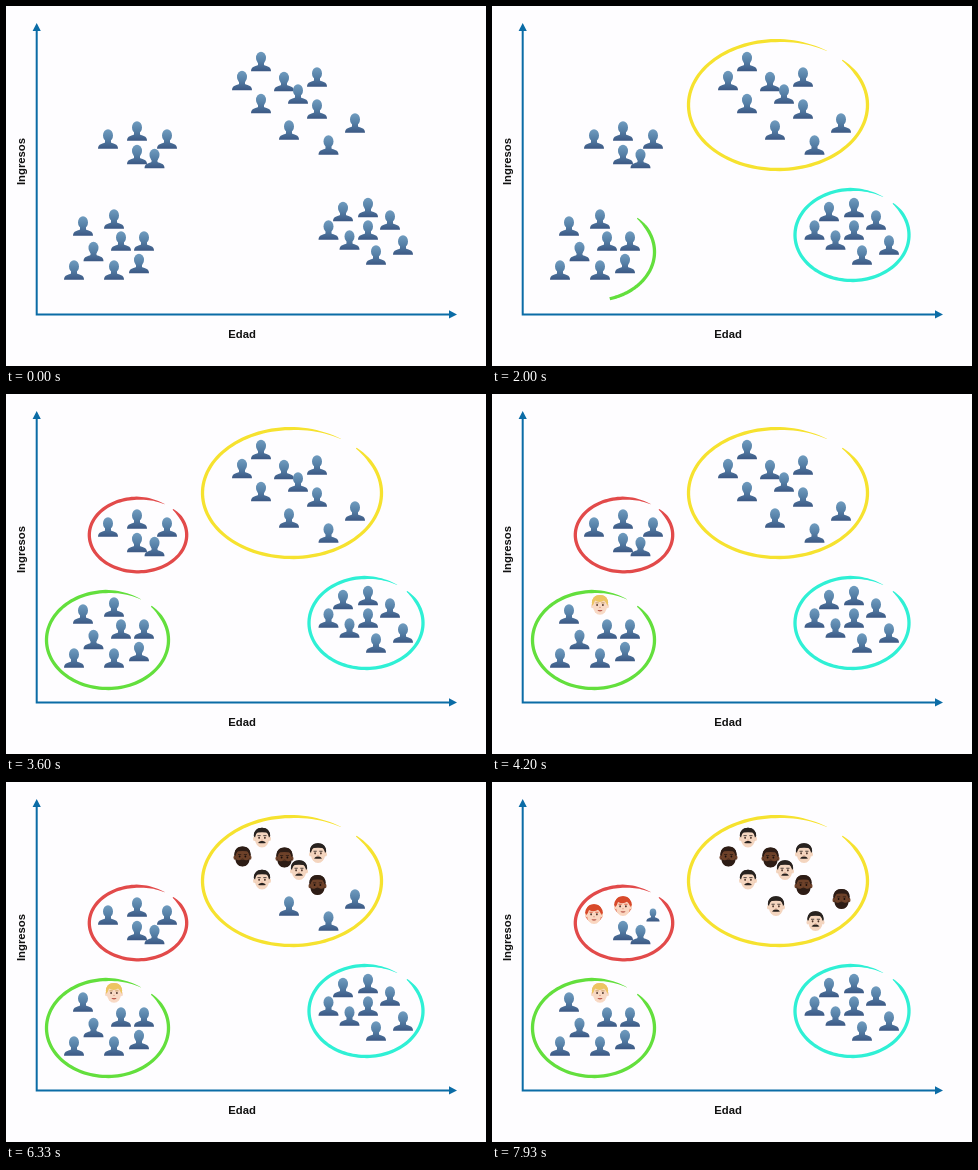
Recreate the animation shown at these times as an HTML page with a canvas. Size 480x360 px, loop 8 s.

```html
<!DOCTYPE html>
<html lang="es">
<head>
<meta charset="utf-8">
<style>
html, body { margin: 0; width: 100%; height: 100%; overflow: hidden; background: #fefdff; }
canvas { display: block; width: 480px; height: 360px; }
</style>
</head>
<body>
<canvas></canvas>
<script>
const canvas = document.querySelector('canvas');
const ctx = canvas.getContext('2d');
const dpr = window.devicePixelRatio || 1;
canvas.width = 480 * dpr;
canvas.height = 360 * dpr;

const LOOP = 8000, FACE_START = 3960, FACE_STEP = 300, HALF_SWAP = 120;
const clamp = v => Math.max(0, Math.min(1, v));

const rings = [
  { color: '#f6e22f', box: [286, 99, 89.5, 64.5], start: 450, length: 680 },
  { color: '#2ff0d5', box: [360, 229, 57, 45.5], start: 1210, length: 560 },
  { color: '#63df3d', box: [101.5, 246, 61, 48.5], start: 1780, length: 560 },
  { color: '#e24a4a', box: [132, 141, 48.7, 36.8], start: 2350, length: 540 }
];

// Each group lists x, y of its people; faces gives the type that replaces them, in order.
const groups = [
  { first: 0, faces: 'B', at: [108, 213, 77, 220, 115, 235, 138, 235, 87.5, 245.5, 68, 264, 108, 264, 133, 257.5] },
  { first: 1, faces: 'MDDMMMDMDM', at: [255, 55.5, 236, 74.5, 278, 75.5, 311, 71, 292, 88, 255, 97.5,
    311, 103, 283, 124, 349, 117, 322.5, 139] },
  { first: 11, faces: 'RRR', at: [102, 133, 131, 125, 161, 133, 131, 148.5, 148.5, 152.5] },
  { first: 0, faces: '', at: [337, 205.5, 362, 201.5, 384, 214, 322.5, 224, 362, 224, 343.5, 234, 397, 239, 370, 249] }
];
const people = groups.flatMap(({ first, faces, at }) =>
  Array.from({ length: at.length / 2 }, (_, i) => ({
    x: at[2 * i], y: at[2 * i + 1], type: faces[i],
    start: faces[i] ? FACE_START + (first + i) * FACE_STEP : Infinity
  })));

const looks = {
  M: { skin: '#f4d5bf', hair: '#28221f', dx: 1, dy: 0.3 },
  D: { skin: '#6d4129', hair: '#2d1c15', dx: 0.5, dy: 0 },
  B: { skin: '#f8d9c5', hair: '#edc462', dx: 0, dy: -2 },
  R: { skin: '#fad6c0', hair: '#d8492a', dx: 0, dy: -0.7 }
};

function oval(x, y, rx, ry, color, from = 0, to = 2 * Math.PI) {
  ctx.fillStyle = color;
  ctx.beginPath();
  ctx.ellipse(x, y, rx, ry, 0, from, to);
  ctx.fill();
}

function shape(path, color) {
  ctx.fillStyle = color;
  ctx.fill(new Path2D(path));
}

function drawBust() {
  const blue = ctx.createLinearGradient(0, -10, 0, 10);
  blue.addColorStop(0, '#719dc0');
  blue.addColorStop(0.5, '#557fa6');
  blue.addColorStop(1, '#3b5783');
  oval(0, -3.6, 5, 6.2, blue);
  shape('M-3 0V3.5C-5 5-10 4.5-10 9.8H10C10 4.5 5 5 3 3.5V0Z', blue);
}

function drawFace(type) {
  const { skin, hair, dx, dy } = looks[type];
  ctx.translate(dx, dy);
  const long = type === 'R';
  oval(0, long ? -1 : -2.2, long ? 9 : 8.2, long ? 9 : 7.9, hair);
  oval(-7.6, 1, 1.4, 2.2, skin);
  oval(7.6, 1, 1.4, 2.2, skin);
  oval(0, 1, 7.1, 8.8, skin);
  if (type === 'D') {
    shape('M-7.1 1C-6 5-4 3.4 0 3.4S6 5 7.1 1C7.4 7 4 10 0 10S-7.4 7-7.1 1Z', hair);
  }
  if (type === 'M' || type === 'D') {
    shape('M-7.6 0C-9-7-5-10 0-10S9-7 7.6 0C6.5-3 6-5 4-5.2Q0-6-4-5.2C-6-5-6.5-3-7.6 0Z', hair);
    shape('M-4 5.2Q-2 2.5 0 3.3Q2 2.5 4 5.2Q0 5.8-4 5.2Z', hair);
  } else {
    shape('M-7.8 1C-9-7-5-10 0-10S9-7 7.8 1C6.5-1 6-3 4-4.5Q0-1.8-5-4.4Q-6-1-7.8 1Z', hair);
    oval(0, 5, 2.5, 1.4, '#bd5e50', 0, Math.PI);
  }
  const dark = type === 'D' ? '#170d09' : '#4a3025';
  for (const side of [-1, 1]) {
    oval(side * 2.9, 0, 0.9, 1.1, dark);
    ctx.fillStyle = type === 'B' ? '#b98d4c' : hair;
    ctx.fillRect(side * 2.9 - 1.6, -2.5, 3.2, 0.8);
  }
  oval(0, 2.4, 1, 0.6, type === 'D' ? '#50301f' : '#dfac94');
}

function drawPerson({ x, y, type, start }, t) {
  const swap = (t - start) / HALF_SWAP;
  const left = 1 - clamp(swap - 1);
  const scale = swap < 1 ? 1 - clamp(swap) ** 2 : 1 - left * left;
  ctx.save();
  ctx.translate(x, y);
  ctx.scale(scale, scale);
  if (swap < 1) drawBust();
  else drawFace(type);
  ctx.restore();
}

// A brush stroke around an ellipse, thin at its tail.
function drawRing({ color, box: [cx, cy, rx, ry], start, length }, t) {
  const p = clamp((t - start) / length);
  if (!p) return;
  const drawn = p * p * (3 - 2 * p), steps = 120, edge = [];
  for (let i = 0; i <= steps; i++) {
    const u = drawn * i / steps;
    const angle = -0.77 + u * 6.06;
    const half = 1.65 * Math.min(1, 0.35 + u * 16, 0.1 + (1 - u) * 9);
    edge.push([angle, half]);
  }
  const trace = side => ([a, half]) =>
    ctx.lineTo(cx + (rx + side * half) * Math.cos(a), cy + (ry + side * half) * Math.sin(a));
  ctx.fillStyle = color;
  ctx.beginPath();
  edge.forEach(trace(1));
  edge.reverse().forEach(trace(-1));
  ctx.fill();
}

function drawAxes() {
  const blue = '#0b6ca6';
  ctx.strokeStyle = blue;
  ctx.lineWidth = 2;
  ctx.stroke(new Path2D('M30.7 23V308.4H445'));
  shape('M30.7 17L34.8 25H26.6ZM451 308.4L443 304.3V312.5Z', blue);
  ctx.fillStyle = '#111';
  ctx.font = 'bold 11.3px "Liberation Sans", Arial, sans-serif';
  ctx.textAlign = 'center';
  ctx.fillText('Edad', 236, 332);
  ctx.save();
  ctx.translate(19, 155.5);
  ctx.rotate(-Math.PI / 2);
  ctx.fillText('Ingresos', 0, 0);
  ctx.restore();
}

function render(now) {
  const t = now % LOOP;
  ctx.setTransform(dpr, 0, 0, dpr, 0, 0);
  ctx.fillStyle = '#fefdff';
  ctx.fillRect(0, 0, 480, 360);
  drawAxes();
  people.forEach(person => drawPerson(person, t));
  rings.forEach(ring => drawRing(ring, t));
}

let origin;
function tick(now) {
  origin ??= now;
  render(now - origin);
  requestAnimationFrame(tick);
}
requestAnimationFrame(tick);
</script>
</body>
</html>
```
